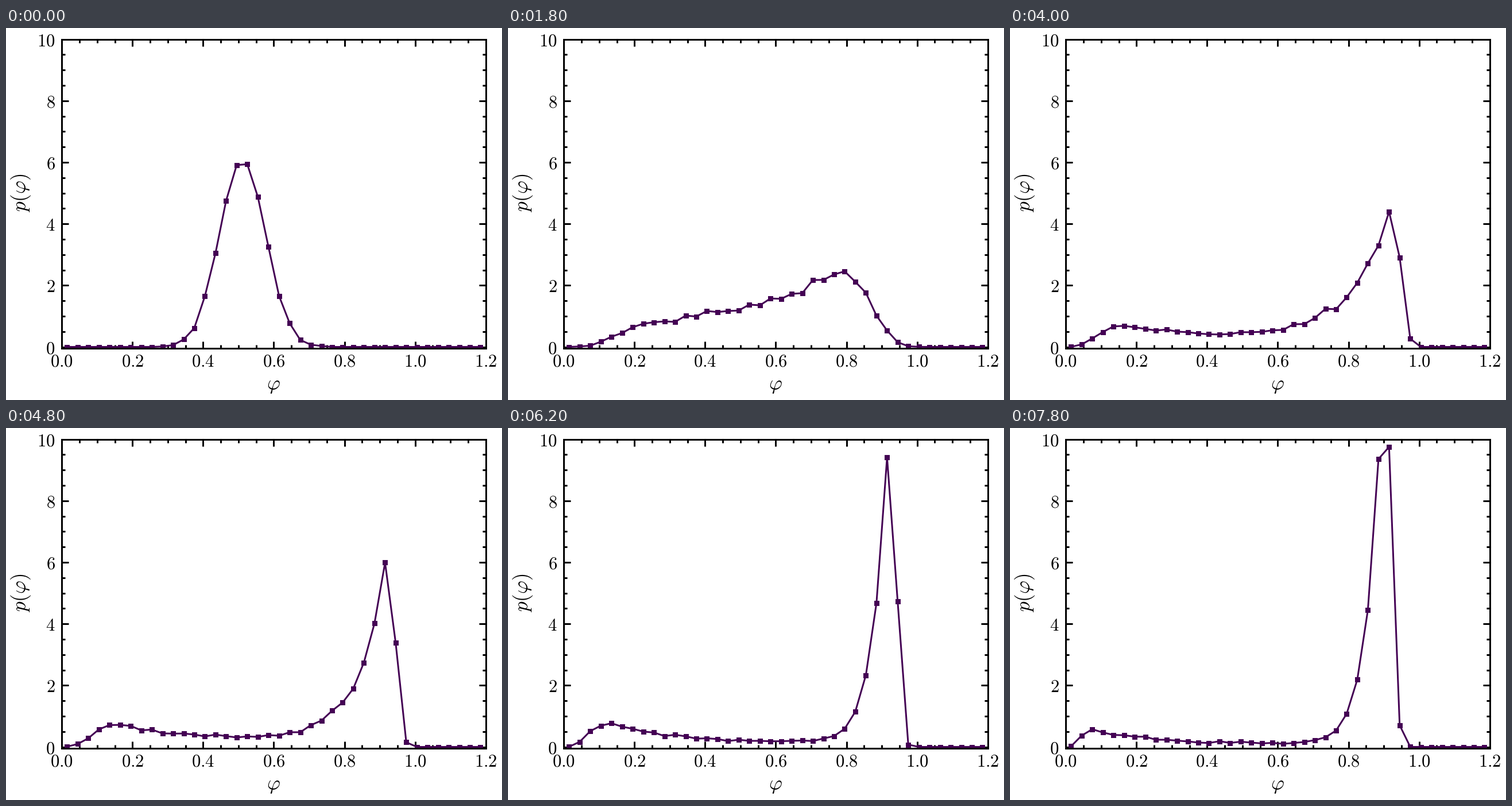
A matplotlib script for the animation above (8 s loop, 864 by 648 pixels).

```python
import numpy as np
import matplotlib.pyplot as plt
from matplotlib.animation import FuncAnimation
from matplotlib.ticker import AutoMinorLocator, FuncFormatter, MultipleLocator

W, H, DPI = 864, 648, 144
FRAMES, INTERVAL = 40, 200
BINS, STEP = 40, 0.03
SPLIT = 9           # frame at which the single hump has fully spread
COLOR = "#440154"

plt.rcParams["mathtext.fontset"] = "cm"

edges = np.arange(BINS + 1) * STEP
phi = edges[:-1] + STEP / 2

# Dense peak: place, height and length of its left tail over stage 0..1
STAGE = [0, 0.2, 0.37, 0.5, 0.73, 1]
PLACE = [0.77, 0.885, 0.915, 0.915, 0.915, 0.895]
HEIGHT = [1.8, 3.9, 4.1, 5.5, 9.3, 11.9]
TAIL = [0.25, 0.085, 0.11, 0.08, 0.04, 0.04]


def separated(s):
    """Dilute shoulder plus dense peak, cut off steeply on the right."""
    mu, height, tail = (np.interp(s, STAGE, v) for v in (PLACE, HEIGHT, TAIL))
    cut = 0.034 + 0.09 * np.exp(-s / 0.15)
    rise = 0.13 - 0.08 * s**2 + 0.04 * np.exp(-s / 0.1)
    floor = 0.62 * np.exp(-1.8 * s)
    bump = 4.4 * s * (1 - s) + 0.8 * s
    below = np.maximum(mu - phi, 0)
    above = np.maximum(phi - mu, 0)
    p = floor + bump * np.exp(-phi / 0.15) + height * np.exp(-below / tail)
    return p * (1 - np.exp(-(phi / rise)**3)) * np.exp(-(above / cut)**2.8)


def mixed():
    return 6.1 * np.exp(-0.5 * ((phi - 0.51) / 0.065)**2)


def quantiles(p, q):
    cdf = np.r_[0, np.cumsum(p)]
    return np.interp(q, cdf / cdf[-1], edges)


def spread(a, b, u):
    """Carry the mass of a over to b, so that the hump widens."""
    q = np.linspace(0.0004, 0.9996, 2500)
    x = (1 - u) * quantiles(a, q) + u * quantiles(b, q)
    return np.diff(np.interp(edges, x, q, left=0, right=1)) / STEP


def density(i):
    if i < SPLIT:
        p = spread(mixed(), separated(0), np.sin(i / SPLIT * np.pi / 2))
    else:
        p = separated((i - SPLIT) / (FRAMES - 1 - SPLIT))
    noise = np.random.default_rng(i).normal(0, 0.05, BINS)
    return np.maximum(p + noise * np.sqrt(p), 0)


fig = plt.figure(figsize=(W / DPI, H / DPI), dpi=DPI, facecolor="white")
left, right, top, bottom = 97.2, 835.7, 19.5, 558.2
ax = fig.add_axes([left / W, 1 - bottom / H,
                   (right - left) / W, (bottom - top) / H])
ax.set_xlim(0, 1.2)
ax.set_ylim(-0.05, 10)

for axis, step, fmt in ((ax.xaxis, 0.2, "$%.1f$"), (ax.yaxis, 2, "$%d$")):
    axis.set_major_locator(MultipleLocator(step))
    axis.set_minor_locator(AutoMinorLocator(4))
    axis.set_major_formatter(FuncFormatter(lambda v, _, f=fmt: f % abs(v)))
ax.tick_params(which="both", direction="in", top=True, right=True, width=1.5)
ax.tick_params(which="major", length=6, labelsize=15.3)
ax.tick_params(which="minor", length=3)
ax.tick_params(axis="x", pad=4.3)
ax.tick_params(axis="y", pad=5.8)
for spine in ax.spines.values():
    spine.set_linewidth(1.5)

fig.text(465.5 / W, 1 - 622 / H, r"$\varphi$", size=17.6,
         ha="center", va="center")
fig.text(26.5 / W, 1 - 287 / H, r"$p(\varphi)$", size=17.6, rotation=90,
         ha="center", va="center")

line, = ax.plot(phi, density(0), "s-", color=COLOR, lw=1.5, ms=3.5)


def update(i):
    line.set_ydata(density(i))
    return line,


anim = FuncAnimation(fig, update, frames=FRAMES, interval=INTERVAL,
                     repeat=True, repeat_delay=0)
plt.show()
```
